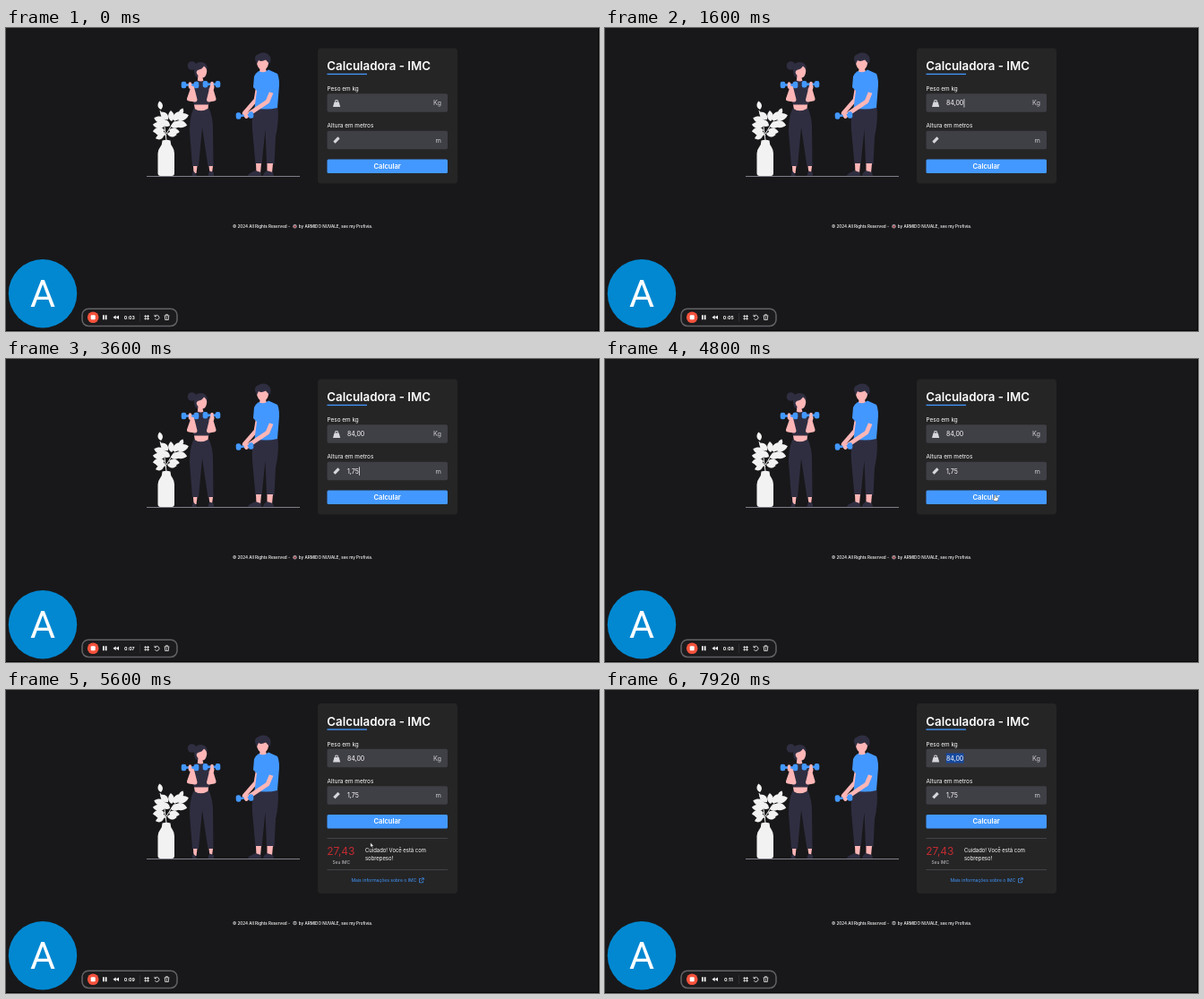
These frames come from a looping animation (662x338 px, 8 s). An HTML page:

```html
<!DOCTYPE html>
<html lang="pt-BR">
<head>
<meta charset="utf-8">
<title>Calculadora - IMC</title>
<style>
html, body { margin: 0; width: 100%; height: 100%; overflow: hidden; background: #18181a; }
svg { display: block; width: 662px; height: 338px; font-family: Inter, "Open Sans", sans-serif; fill: #fff; }
.mid { text-anchor: middle; }
.label { font-size: 6.4px; }
.value { font-size: 7px; }
.unit { font-size: 7.3px; fill: #c9c9ce; text-anchor: end; }
.box { fill: #3f3f46; }
.soft { fill: #d6d6dc; }
.blue { fill: #4398ff; }
.dark { fill: #2f2e41; }
.skin { fill: #ffb6b6; }
.pale { fill: #f2f2f2; }
.line { fill: none; stroke: #fff; stroke-width: .75; }
.limb { fill: none; stroke: #ffb6b6; stroke-linecap: round; stroke-linejoin: round; }
</style>
</head>
<body>
<svg viewBox="0 0 662 338">
  <defs>
    <g id="bell" class="blue">
      <rect x="-7" y="-1.3" width="14" height="2.6"/>
      <rect x="-9.800" y="-3.700" width="5.600" height="7.400" rx="2.200"/>
      <rect x="4.200" y="-3.700" width="5.600" height="7.400" rx="2.200"/>
    </g>
    <path id="leaf" d="M0 0C-4.500-3-4.500-8 0-12C4.500-8 4.500-3 0 0"/>
  </defs>

  <g id="scene">
    <rect x="157" y="165" width="171" height=".9" fill="#8b8b96"/>
    <!-- plant -->
    <g class="pale">
      <path d="M174.500 125.500Q179 124 183.500 125.500Q183.500 130 186 133Q188 136 188 140V162Q188 165 185 165H172.500Q169.500 165 169.500 162V140Q169.500 136 172 133Q174.500 130 174.500 125.500Z"/>
      <path d="M179 125Q178 108 172 92M179 120Q172 112 168 109M179 118Q185 107 194 97" fill="none" stroke="#f2f2f2"/>
      <g id="leaves"></g>
    </g>
    <!-- woman -->
    <g>
      <circle class="dark" cx="207.500" cy="42" r="4.800"/>
      <path class="dark" d="M210 48Q209 38 217 38Q225 38 224.500 46L222 55Q214 58 211 53Z"/>
      <path class="skin" d="M214 47Q219 46 221 42.500Q225 45 224 50Q223 55 219.500 55.500L221 61H213.500L214.500 53Q211 49 214 47Z"/>
      <path class="dark" d="M210 60L214 58.500Q217 60.500 221 58.500L228 61Q232 66 230 75L226.500 86H210L207 75Q203 66 210 60Z"/>
      <path class="skin" d="M210 85.500H226L225.500 91Q218 95 211 91Z"/>
      <path class="dark" d="M209.500 89.500Q217 95 226.500 89.500Q231 99 231 112L231.500 154H225.500L219 111L215 154H208L205 115Q205 99 209.500 89.500Z"/>
      <path class="skin" d="M209 154H213.500L212.500 162H209.500ZM226.500 154H231L230 162H227.500Z"/>
      <path class="dark" d="M209 159.500Q212 162 213 164.800H207.500ZM227 159.500Q230 160 232 161.500V164.800H225.500Z"/>
      <path class="limb" stroke-width="5" d="M208 69L204.500 79L211 80L207.500 66M229 69L232 79L226.500 80L230 66"/>
      <use href="#bell" x="205.500" y="63.500"/>
      <use href="#bell" x="229.500" y="62.800"/>
      <path class="limb" stroke-width="3.500" d="M205.500 62V66M230 61.500V65.500"/>
    </g>
    <!-- trainer -->
    <g>
      <path class="skin" d="M280 34L292 33Q295 41 290 46L293 53H282L283.500 46Q279 42 280 34Z"/>
      <path class="dark" d="M280 40Q275 31 282 29Q290 25 295 32Q296.500 37 294 40L290 35.500Q285 38 282 36Z"/>
      <path class="limb" stroke-width="4.600" d="M281 68L279 80L266 95"/>
      <path class="dark" d="M277 88H303.500Q305 104 301 121L299.500 152H291L289.500 113L285.500 152H278.500L275 113Q274 98 277 88Z"/>
      <path class="skin" d="M279 151H285L284 162H279.500ZM291.500 151H298L297 162H291.500Z"/>
      <path class="dark" d="M278.500 159L284.500 161L285 164.800H270Q270 162.500 278.500 159ZM291 159L298 161L299 164.800H287Q287 162 291 159Z"/>
      <path class="blue" d="M282 48Q288 51 293 46.500L303 51Q306 57 304.500 70L303 89Q290 92 277.500 89L280 70L276 66L277 54Q278 51 282 48Z"/>
      <path class="limb" stroke-width="4.600" d="M297 70L292 82L268 98"/>
      <path class="blue" d="M294 57L304 59L302 74L293 71Z"/>
      <use href="#bell" transform="translate(266.500 97.500) rotate(-4)"/>
      <path class="limb" stroke-width="4" d="M267 95.500L268.500 99"/>
    </g>
  </g>

  <g id="card">
    <rect id="panel" x="348" width="156" height="151" rx="4" fill="#252526"/>
    <text x="358.300" y="24.900" font-size="13.300" font-weight="600">Calculadora - IMC</text>
    <rect class="blue" x="358.500" y="28.400" width="44.500" height="1.300"/>
    <text class="label" x="358.500" y="47.500">Peso em kg</text>
    <rect class="box" x="358.500" y="50.800" width="134.500" height="20.500" rx="1.800"/>
    <path class="soft" fill-rule="evenodd" d="M366.500 60H367.500Q366.500 57.600 369 57.600Q371.500 57.600 370.700 60H371.700L373.200 65.500H365ZM368.200 60H370Q370.200 58.600 369 58.600Q368 58.600 368.200 60"/>
    <text class="unit" x="486" y="64">Kg</text>
    <rect id="mark" x="380.800" y="55.500" height="11" fill="#174a9f"/>
    <text class="label" x="358.500" y="88.900">Altura em metros</text>
    <rect class="box" x="358.500" y="92.300" width="134.500" height="20.500" rx="1.800"/>
    <rect class="soft" x="-3.700" y="-1.600" width="7.400" height="3.200" rx=".5" transform="translate(369 102.600) rotate(-45)"/>
    <text class="unit" x="486" y="105.300">m</text>
    <text class="value" id="weight" x="381" y="64"></text>
    <text class="value" id="height" x="381" y="105.200"></text>
    <rect id="caret" width=".7" height="9.500"/>
    <rect class="blue" x="358.500" y="124" width="134.500" height="15.500" rx="1.500"/>
    <text class="mid" x="425.700" y="134.300" font-size="7.600" font-weight="600">Calcular</text>
    <g id="result">
      <path d="M358.500 150.500H493M358.500 185.500H493" stroke="#4a4a50" stroke-width=".8"/>
      <text x="358.300" y="168.800" font-size="12" fill="#c32b30">27,43</text>
      <text class="mid" x="374.200" y="179.100" font-size="4.900" fill="#c9c9ce">Seu IMC</text>
      <text font-size="5.900"><tspan x="401" y="166">Cuidado! Você está com</tspan><tspan x="401" y="174.500">sobrepeso!</tspan></text>
      <text class="blue" x="385.500" y="199.100" font-size="5.050">Mais informações sobre o IMC</text>
      <path d="M463.500 195.500H461.500V199.800H465.500V197.800M464 194.800H466.300V197.100M466.200 194.900L463.300 197.800" fill="none" stroke="#4398ff" stroke-width=".7"/>
    </g>
  </g>

  <g id="footer" font-size="4.600" font-weight="500">
    <text x="253" y="1.600">© 2024 All Rights Reserved -</text>
    <circle cx="322.500" cy="0" r="2.200" fill="#a9a9ad"/>
    <rect id="face" x="321.200" y="-.8" width="2.600" height="2"/>
    <text x="326.800" y="1.600">by ARMIDO NUVALE, see my Profivia.</text>
  </g>

  <circle cx="41" cy="296.200" r="38.200" fill="#0288d1"/>
  <text class="mid" x="41" y="311.300" font-family="Roboto, sans-serif" font-size="43">A</text>

  <!-- recorder bar -->
  <rect x="85" y="313.200" width="106" height="19.200" rx="7" fill="#1c1c1e" stroke="#626266" stroke-width="1.500"/>
  <circle cx="97.200" cy="322.800" r="6.300" fill="#f5523c"/>
  <rect x="94.700" y="320.300" width="5" height="5" rx="1"/>
  <path d="M108 320.300H109.700V325.300H108ZM110.800 320.300H112.500V325.300H110.800ZM122.700 320.500V325.100L119.500 322.800ZM126 320.500V325.100L122.800 322.800Z"/>
  <text class="mid" id="clock" x="137.800" y="324.700" font-size="5.200" font-weight="700"></text>
  <path d="M149.500 318V328" stroke="#36363a" stroke-width=".7"/>
  <path class="line" d="M155.800 320V325.700M158.500 320V325.700M154.300 321.500H160M154.300 324.200H160M166.400 321.500A2.500 2.500 0 1 1 166.200 324M166 319.800V321.800H168M177.300 321.200L177.700 325.500H181.300L181.700 321.200M176.700 320.900H182.300M178.500 320.500V319.700H180.500V320.500M179.500 322.500V324.500"/>

  <g id="cursor" stroke="#111" stroke-width=".4">
    <path id="arrow" d="M0 0V5L1.200 4L2 5.800L2.900 5.400L2.100 3.700H3.600Z"/>
    <path id="hand" d="M-.7 .5Q0-.4 .7 .5V2.700L3 3.200Q3.700 3.500 3.500 4.500L2.800 7H-1L-2.800 4.200Q-2.500 3.400-.7 4.500Z"/>
  </g>
  <path d="M0 337.500H662M661.500 0V338" stroke="#050506"/>
</svg>
<script>
const $ = id => document.getElementById(id);
const LOOP = 8000, CLICK = 4860;
const weightKeys = [80, 400, 720, 1040, 1280];
const heightKeys = [2960, 3120, 3360, 3600];
const ticks = [640, 1600, 2720, 3600, 4640, 5600, 6640, 7600];
const caretTimes = [[80, 1840], [2400, 2920], [2960, 4160]];
const route = [
  [4180, 400, 84], [4700, 435.5, 151.5], [5120, 436, 151.5], [5920, 391, 180.5],
  [6680, 391, 180.5], [7120, 438, 165], [7440, 437, 122], [7640, 392, 76]
];

// x, y, angle, scale
const leaves = [
  [173, 91, -10, .8], [194, 97, 25, .7], [178, 104, -75, 1.1], [181, 102, -45, 1],
  [185, 104, -5, 1], [187, 103, 40, 1.1], [190, 101, 75, 1.2], [188, 106, 100, 1.2],
  [177, 109, -85, 1.1], [183, 109, -60, 1], [184, 110, 70, 1.1], [182, 114, 100, 1],
  [177, 114, -95, 1.1], [178, 119, -75, 1], [176, 120, -110, .8], [180, 118, 95, .9]
];
$('leaves').innerHTML = leaves.map(([x, y, a, s]) =>
  `<use href="#leaf" transform="translate(${x} ${y}) rotate(${a}) scale(${s})"/>`).join('');

const passed = (times, t) => times.filter(k => k <= t).length;
const show = (id, on) => $(id).style.display = on ? '' : 'none';
const move = (id, x, y) => $(id).setAttribute('transform', `translate(${x} ${y})`);
const set = (id, name, value) => $(id).setAttribute(name, value);

function pointer(t) {
  const i = route.findIndex(p => p[0] > t);
  if (i < 1) return null;
  const [t0, x0, y0] = route[i - 1], [t1, x1, y1] = route[i];
  const u = (t - t0) / (t1 - t0), e = u * u * (3 - 2 * u);
  return [x0 + (x1 - x0) * e, y0 + (y1 - y0) * e];
}

function drawCursor(t, top) {
  const p = pointer(t);
  show('cursor', p);
  if (!p) return;
  const [x, y] = p, row = y - top;
  const inCard = x > 358 && x < 493;
  const onButton = inCard && row > 124 && row < 140;
  const onField = inCard && (row > 51 && row < 72 || row > 92 && row < 113);
  move('cursor', x, y);
  show('hand', onButton);
  show('arrow', !onButton && !onField);
}

function draw(t) {
  const done = t >= CLICK, top = done ? 15 : 22.4;
  move('scene', 0, done ? 23 : 0);
  move('card', 0, top);
  move('footer', 0, done ? 260 : 221.3);
  set('panel', 'height', done ? 212 : 151);
  set('face', 'fill', done ? '#55555a' : '#a83a48');
  show('result', done);

  $('weight').textContent = '84,00'.slice(0, passed(weightKeys, t));
  $('height').textContent = '1,75'.slice(0, passed(heightKeys, t));
  $('clock').textContent = '0:' + String(3 + passed(ticks, t)).padStart(2, '0');

  const second = t >= 2400;
  const end = $(second ? 'height' : 'weight').getComputedTextLength();
  show('caret', caretTimes.some(([a, b]) => t >= a && t < b));
  set('caret', 'x', 381.3 + end);
  set('caret', 'y', second ? 98 : 56.7);

  show('mark', t >= 7760);
  set('mark', 'width', $('weight').getComputedTextLength() + .4);
  drawCursor(t, top);
}

let start;
function frame(now) {
  start ??= now;
  draw((now - start) % LOOP);
  requestAnimationFrame(frame);
}
requestAnimationFrame(frame);
</script>
</body>
</html>
```
